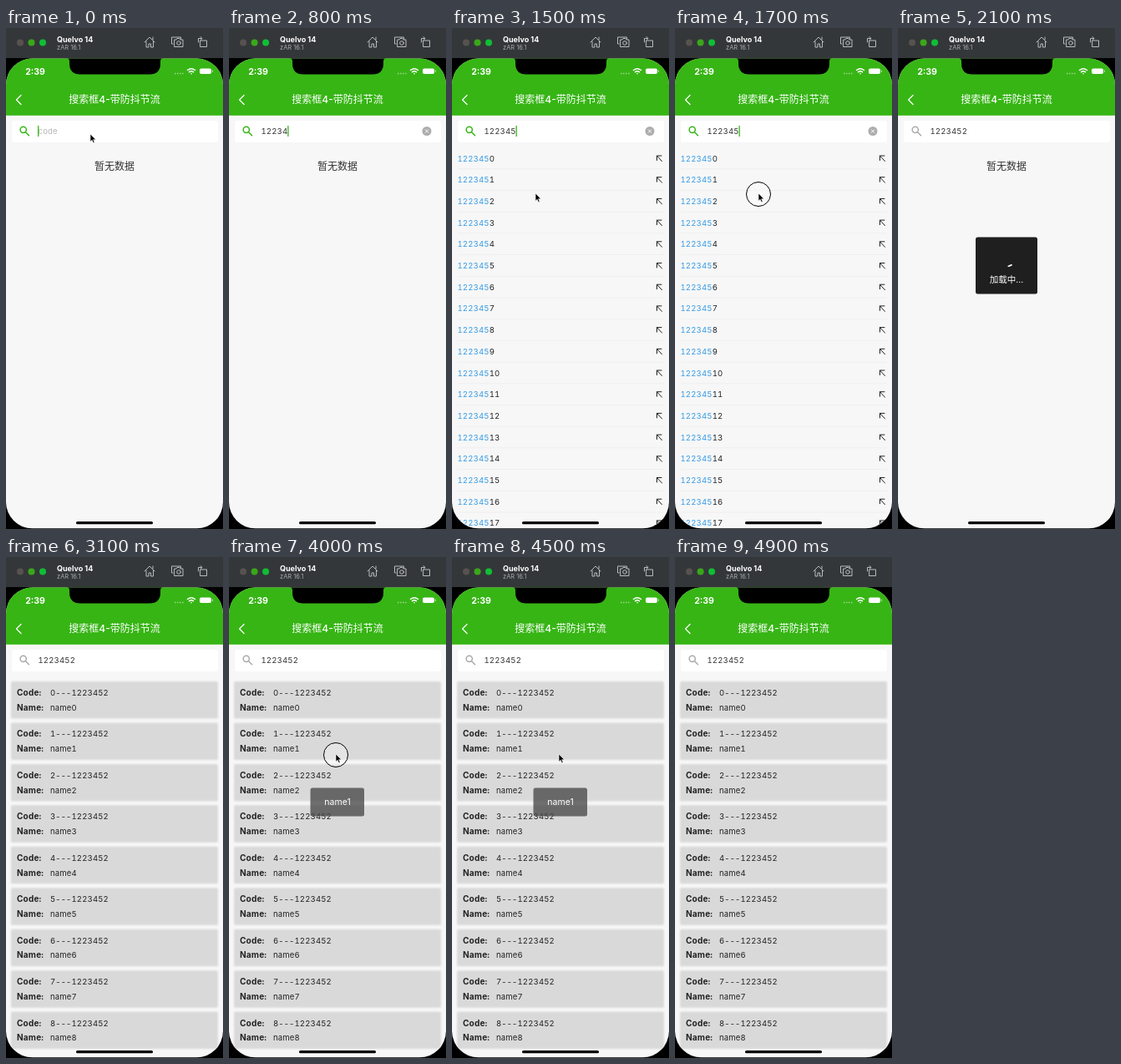
These frames come from a looping animation (260 px wide and 600 px high, 5000 ms). An HTML page:

```html
<!DOCTYPE html>
<html lang="zh">
<head>
<meta charset="utf-8">
<style>
html, body { margin: 0; width: 100%; height: 100%; overflow: hidden; background: #000; }
svg { display: block; font: 10px Inter, "Noto Sans CJK SC", sans-serif; }
.body { font-size: 9.5px; letter-spacing: .2px; font-variant-numeric: tabular-nums; }
.label { font-size: 10px; font-weight: 700; letter-spacing: .2px; }
.bold { font-weight: 700; }
.mid { text-anchor: middle; }
.line { fill: none; stroke-linecap: round; stroke-linejoin: round; }
</style>
</head>
<body>
<svg width="260" height="600" viewBox="0 0 260 600">
  <defs>
    <clipPath id="screen"><rect y="36.500" width="260" height="562.800" rx="31.500"/></clipPath>
    <filter id="soft" x="-5%" y="-20%" width="110%" height="140%"><feGaussianBlur stdDeviation=".9"/></filter>
  </defs>

  <rect width="260" height="36" fill="#343739"/>
  <circle cx="17" cy="17.5" r="4" fill="#57524f"/>
  <circle cx="30.5" cy="17.5" r="4" fill="#3aa719"/>
  <circle cx="44" cy="17.5" r="4" fill="#10bd35"/>
  <text x="61" y="16.5" class="bold" font-size="9" fill="#fff">Quelvo 14</text>
  <text x="61" y="26" font-size="7.5" fill="#a7a9aa">zAR 16.1</text>
  <g class="line" stroke="#b9bcbe">
    <path d="M166 17l6-6 6 6M168 16v7h3v-4h2.500v4h3v-7M176 14v-3"/>
    <path d="M200 19h-1.500v-8h11v2M202 14h2l1-1.500h3l1 1.500h3v8.500h-10z"/>
    <circle cx="207" cy="18" r="2.300"/>
    <path d="M233 15h7.500v7.500h-7.500zM230.500 17v-4.500h4M233 10.500l2 2-2 2"/>
  </g>

  <g clip-path="url(#screen)">
    <rect y="36" width="260" height="564" fill="#f7f7f7"/>
    <rect y="36" width="260" height="68.800" fill="#37b515"/>
    <path d="M72 36q4 0 4 4v2.500q0 13 13 13h83q13 0 13-13v-2.500q0-4 4-4z"/>
    <text x="35" y="55.500" class="bold mid" font-size="10.500" fill="#fff">2:39</text>
    <path d="M202 54.500h11" stroke="#fff" stroke-opacity=".5" stroke-width="1.500" stroke-dasharray="1.500 1.500"/>
    <g class="line" stroke="#fff" stroke-width="1.500">
      <path d="M217.500 50.500q4.500-3.500 9 0M219.500 52.700q2.500-2 5 0"/>
      <path d="M222 54.600v.1"/>
      <path d="M18 80.500l-5.500 5.500 5.500 5.500" stroke-width="1.200"/>
    </g>
    <rect x="232" y="48.500" width="14" height="6.500" rx="2" fill="#fff"/>
    <path d="M247.500 50.500v2.500" stroke="#fff" stroke-opacity=".6"/>
    <text x="130" y="90.300" class="mid" font-size="12" font-weight="500" fill="#fff">搜索框4-带防抖节流</text>

    <rect x="7" y="111" width="247" height="26" rx="3" fill="#fff"/>
    <g id="lens" class="line" stroke-width="1.500"><circle cx="20.700" cy="121.800" r="3.600"/><path d="M23.500 124.700l4 4"/></g>
    <text id="query" class="body" x="38.500" y="127"/>
    <path id="caret" d="M0 117v13" stroke="#37b515" stroke-width="1.300"/>
    <g id="clear"><circle cx="237" cy="123.500" r="5.500" fill="#adadad"/><path d="M235 121.500l4 4m0-4l-4 4" stroke="#fff"/></g>

    <text id="empty" x="130" y="169.500" class="mid" font-size="12" fill="#333">暂无数据</text>
    <g id="hints" class="body"></g>
    <g id="cards" class="body"></g>

    <g id="loading">
      <rect x="93" y="250.500" width="74" height="68" rx="2.500" fill="#1f1f1f"/>
      <path id="arc" class="line" stroke="#fff" stroke-width="1.700"/>
      <text x="130" y="304.500" class="mid" font-size="10.500" fill="#fff">加载中...</text>
    </g>
    <g id="toast">
      <rect x="97.500" y="276.500" width="64.500" height="34" rx="2.500" fill="#4a4a4a" fill-opacity=".78"/>
      <text x="130" y="297" class="mid" font-size="10.500" fill="#fff">name1</text>
    </g>
    <rect x="84" y="591" width="92" height="3.300" rx="1.600"/>
  </g>

  <g id="mouse">
    <circle id="ring" cy="1" r="14.500" fill="#fff" fill-opacity=".3" stroke="#000"/>
    <path d="M0 0v9.200l2.100-1.900 1.500 3.300 1.500-.7-1.400-3.200h2.900z" stroke="#fff" stroke-width=".6"/>
  </g>
</svg>
<script>
const el = id => document.getElementById(id);
const repeat = (n, draw) => Array.from({ length: n }, (_, i) => draw(i)).join('');
const show = (id, on) => { el(id).style.display = on ? '' : 'none'; };
const clamp = x => Math.max(0, Math.min(1, x));
const ease = x => (x = clamp(x)) * x * (3 - 2 * x);

const prefix = '122345';
const chosen = prefix + '2';
const keyTimes = [200, 300, 500, 600, 800, 900];

el('hints').innerHTML = repeat(18, i => {
  const y = 156 + i * 25.7;
  return `<text x="6.500" y="${y + 3.5}" fill="#222"><tspan fill="#369be6">${prefix}</tspan>${i}</text>
    <path d="M245.500 ${y + 2.5}v-5.500h5.500m-5.500 0l6 6.500" class="line" stroke="#222"/>
    <path d="M7 ${y + 12.8}h247" stroke="#efefef"/>`;
});

el('cards').innerHTML = repeat(9, i => {
  const y = 149 + i * 49.45;
  const row = (dy, label, value) => `<text x="13" y="${y + dy}" class="label">${label}:</text>
    <text x="53" y="${y + dy}">${value}</text>`;
  return `<rect x="6" y="${y}" width="248" height="44.500" rx="1.500" fill="#d9d9d9" filter="url(#soft)"/>
    <g fill="#222">${row(17, 'Code', `${i}---${chosen}`)}${row(34.7, 'Name', `name${i}`)}</g>`;
});

function spinner(t) {
  const phase = (1130 + (t - 2100) * 1.392) / 1333;
  const p = phase - Math.floor(phase);
  const tail = 270 * (1 - (1 - clamp(p * 2 - 1)) ** 2.2);
  const sweep = Math.max(1, 270 * ease(p * 2) - tail);
  const start = tail + 90 * p + 92;
  const point = deg => {
    const a = deg * Math.PI / 180;
    return `${130 + 11.5 * Math.cos(a)} ${274 + 11.5 * Math.sin(a)}`;
  };
  el('arc').setAttribute('d', `M${point(start)}A11.5 11.5 0 ${+(sweep > 180)} 1 ${point(start + sweep)}`);
}

function moveMouse(t) {
  const down = ease((t - 1100) / 400), across = ease((t - 3300) / 500);
  const x = 101 - down + 28 * across;
  const y = 127 + 71 * down + 38 * across;
  el('mouse').setAttribute('transform', `translate(${x} ${y})`);
  show('mouse', t < 200 || (t >= 1100 && t < 1900) || (t >= 3400 && t < 4800));
  show('ring', (t >= 1700 && t < 1900) || (t >= 3900 && t < 4200));
}

function render(t) {
  const typing = t < 1900;
  const typed = typing ? prefix.slice(0, keyTimes.filter(k => k <= t).length) : chosen;
  const query = el('query');
  query.textContent = typed || 'code';
  query.setAttribute('fill', typed ? '#333' : '#b5b5b5');
  const caretX = typed ? 39 + query.getComputedTextLength() : 38.7;
  el('caret').setAttribute('transform', `translate(${caretX})`);
  el('lens').setAttribute('stroke', typing ? '#37b515' : '#aaa');
  show('caret', typing);
  show('clear', typing && typed);
  show('hints', t >= 1100 && typing);
  show('empty', t < 1100 || (t >= 1900 && t < 3100));
  show('loading', t >= 1900 && t < 3100);
  show('cards', t >= 3100);
  show('toast', t >= 4000 && t < 4700);
  spinner(t);
  moveMouse(t);
}

const begin = performance.now();
function tick() {
  const t = (performance.now() - begin) % 5000;
  render(Math.floor(t / 100) * 100);
  requestAnimationFrame(tick);
}
tick();
</script>
</body>
</html>
```
